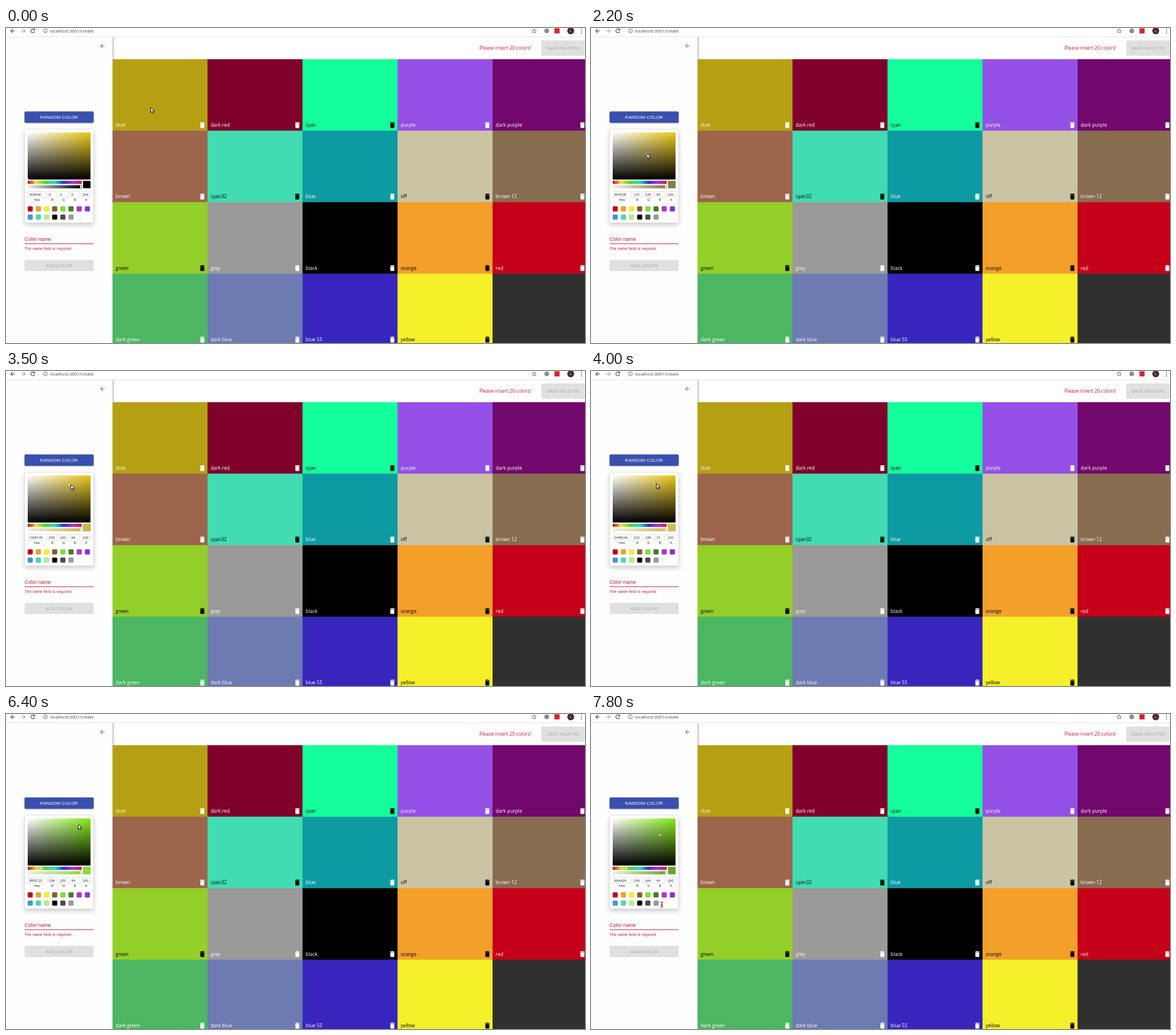
These frames come from a looping animation (1014 px wide and 552 px high, 8000 ms). An HTML page:

```html
<!DOCTYPE html>
<html lang="en">
<head>
<meta charset="utf-8">
<title>Create a palette</title>
<style>
  html, body { margin: 0; width: 100%; height: 100%; overflow: hidden; background: #fff; }
  svg { display: block; }
  text { font-family: "Liberation Sans", Arial, sans-serif; }
  .ui { font: 500 8.5px "Open Sans", "Noto Sans", sans-serif; }
  .url { font: 7.65px "Open Sans", "Noto Sans", sans-serif; fill: #444; }
  .btn { font-size: 7.7px; letter-spacing: .22px; text-anchor: middle; }
  .small { font-size: 6.05px; fill: #222; }
  .mid { text-anchor: middle; }
  .off { fill: #a6a6a6; }
  .error { fill: #c4122f; }
  .line { fill: none; stroke: #555; stroke-width: 1.2; }
  .card { fill: #fff; filter: drop-shadow(0 0 .5px #0006) drop-shadow(0 4px 4px #0003); }
  .raised { fill: #3a50ae; filter: drop-shadow(0 1px 1px #0006); }
</style>
</head>
<body>
<svg width="1014" height="552" viewBox="0 0 1014 552">
  <defs>
    <linearGradient id="white"><stop stop-color="#fff"/><stop offset="1" stop-color="#fff" stop-opacity="0"/></linearGradient>
    <linearGradient id="black" x1="0" y1="1" x2="0" y2="0"><stop/><stop offset="1" stop-opacity="0"/></linearGradient>
    <linearGradient id="hues"></linearGradient>
    <linearGradient id="fade"><stop class="tone" stop-opacity="0"/><stop class="tone" offset="1"/></linearGradient>
    <linearGradient id="edge"><stop stop-color="#bbb"/><stop offset="1" stop-color="#fff"/></linearGradient>
    <pattern id="checks" x="38" y="275.4" width="4.4" height="4.4" patternUnits="userSpaceOnUse">
      <path fill="#fff" d="M0 0h4.4v4.4H0z"/><path fill="#ddd" d="M0 0h2.2v2.2H0zM2.2 2.2h2.2v2.2H2.2z"/>
    </pattern>
    <clipPath id="area"><path d="M37.5 182.5h111v83h-111z"/></clipPath>
    <path id="square" d="M38 183h110v82.500H38z"/>
    <path id="bin" transform="scale(.57) translate(-12 -12)" d="M6 19c0 1.1.9 2 2 2h8c1.1 0 2-.9 2-2V7H6v12zM19 4h-3.5l-1-1h-5l-1 1H5v2h14V4z"/>
    <rect id="thumb" width="2.3" height="4.8" rx=".5" fill="#fff" stroke="#0006" stroke-width=".3"/>
  </defs>

  <!-- browser bar -->
  <path class="line" d="M15.5 5.2h-7M11.8 1.7L8.3 5.2l3.5 3.5"/>
  <path class="line" style="stroke:#aaa" d="M26.5 5.2h7M30.2 1.7l3.5 3.5-3.5 3.5"/>
  <path class="line" d="M49.5 2.8a3.4 3.4 0 1 0 .7 3.2M50.3 1v2.6h-2.600"/>
  <circle class="line" cx="69" cy="5" r="3.5" style="stroke-width:.8"/>
  <path class="line" style="stroke-width:.9" d="M69 4.6v2.4M69 2.9v.9"/>
  <text class="url" x="77" y="7.7">localhost:3001/create</text>
  <path class="line" style="stroke-width:.8" d="M925 1.2l1.100 2.600 2.800.2-2.100 1.800.7 2.800-2.500-1.500-2.500 1.500.7-2.800-2.100-1.800 2.800-.2z"/>
  <circle cx="947" cy="5" r="4.3" fill="#8c8f8c"/>
  <path fill="#d3232f" d="M960.5 .5h9v9h-9z"/>
  <circle cx="989" cy="5" r="6" fill="#492b2c"/>
  <text class="mid" x="989" y="7.3" font-size="6" fill="#eee">L</text>
  <path fill="#555" d="M1007 1h1.600v1.600H1007zM1007 4.400h1.600V6H1007zM1007 7.800h1.600v1.600H1007z"/>

  <!-- sidebar -->
  <path fill="#fefefe" d="M0 15.5h186.500V552H0z"/>
  <path fill="#ddd" d="M0 15h1014v.8H0z"/>
  <path class="line" style="stroke:#777;stroke-width:1.1" d="M173 31.3h-7M169.200 27.800l-3.500 3.500 3.500 3.500"/>
  <rect class="raised" x="32.5" y="146.3" width="121" height="19.8" rx="2"/>
  <text class="btn" x="93" y="159">RANDOM COLOR</text>
  <rect class="card" x="32.5" y="177.5" width="121" height="163.5" rx="2"/>
  <use id="base" href="#square"/>
  <use href="#square" fill="url(#white)"/>
  <use href="#square" fill="url(#black)"/>
  <g clip-path="url(#area)"><g id="ring" fill="none">
    <circle r="2.2" stroke="#0006" stroke-width=".6"/><circle r="1.6" stroke="#fff" stroke-width=".9"/>
  </g></g>
  <path fill="url(#hues)" d="M38 267.7h94.500v5.500H38z"/>
  <use id="knob" href="#thumb" y="268"/>
  <path fill="url(#checks)" d="M38 275.4h94.500v5.500H38z"/>
  <path fill="url(#fade)" d="M38 275.4h94.500v5.500H38z"/>
  <use href="#thumb" x="129.7" y="275.8"/>
  <rect id="chip" x="135" y="267.9" width="13" height="12.9" rx="1" stroke="#0004" stroke-width=".5"/>
  <g id="fields"></g>
  <g id="presets"></g>
  <text class="error" x="32.5" y="372.8" font-size="8.8" letter-spacing=".08">Color name</text>
  <path fill="#c4193d" d="M32.5 377.4h121v1.200h-121z"/>
  <text class="error" x="32.5" y="388.6" font-size="6.6" letter-spacing=".22">The name field is required</text>
  <rect x="32.5" y="406.3" width="121" height="19.8" rx="2" fill="#e0e0e0"/>
  <text class="btn off" x="93" y="418.8">ADD COLOR</text>

  <!-- header -->
  <path fill="#fff" d="M186.5 16h828v38.500h-828z"/>
  <path fill="url(#edge)" d="M186.5 16h4v38.500h-4z"/>
  <text class="ui error" x="829" y="38.3">Please insert 20 colors!</text>
  <rect x="937.5" y="21.7" width="76" height="27" rx="2" fill="#e0e0e0"/>
  <text class="btn off" x="975.5" y="38">SAVE PALETTE</text>

  <g id="grid"></g>
  <g id="cursor" fill="#fff" stroke="#000" stroke-width=".9" stroke-linejoin="round">
    <path id="arrow" d="M.5.3v8.900l2.100-1.900 1.500 3.200 1.400-.6-1.500-3.200h2.900z"/>
    <path id="hand" d="M-1 1q0-1 .9-1t.9 1v3l3.600.7q1.400.4 1.200 1.800l-.6 3.500h-5l-3-3.600q-.6-1.100.5-1l1.500.9z"/>
    <path id="beam" fill="none" d="M-2.500-4.500q2.500 0 2.500 1.200 0-1.200 2.500-1.200M0-3.300v6.600M-2.500 4.500q2.500 0 2.500-1.200 0 1.200 2.500 1.200M-1.400.5h2.800"/>
  </g>
</svg>
<script>
const $ = id => document.getElementById(id);
const add = (parent, tag, attrs, text) => {
  const node = document.createElementNS('http://www.w3.org/2000/svg', tag);
  for (const key in attrs) node.setAttribute(key, attrs[key]);
  if (text) node.textContent = text;
  return parent.appendChild(node);
};
document.querySelector('.btn:not(.off)').setAttribute('fill', '#fff');

// Palette: name, fill, and "k" where the label is black
const palette = `dust,#b5a014|dark red,#80002c|cyan,#14ff9c,k|purple,#9450e6|dark purple,#72086c
|brown,#9c654c|cyan32,#41dcb2,k|blue,#0d9aa2|off,#cac4a4,k|brown 12,#886c50
|green,#94ce28,k|grey,#9a9a98|black,#000|orange,#f2a02a,k|red,#c50019
|dark green,#4cb662|dark blue,#6e7ab2|blue 55,#3826bc|yellow,#f5f02a,k|,#303030`;
palette.split('|').forEach((entry, i) => {
  const [name, fill, dark] = entry.trim().split(',');
  const x = 186.5 + i % 5 * 166.4, y = 54.6 + Math.floor(i / 5) * 125.3;
  const ink = dark ? '#000' : '#fff';
  add($('grid'), 'rect', { x, y, width: 167, height: 126, fill });
  if (!name) return;
  add($('grid'), 'text', { class: 'ui', x: x + 5.5, y: y + 118.3, fill: ink }, name);
  add($('grid'), 'use', { href: '#bin', x: x + 157.3, y: y + 115.5, fill: ink });
});

'#c8101e #f0e020 #40d830 #20e0c0 #3030d0 #b030d8 #d01830'.split(' ').forEach((color, i) =>
  add($('hues'), 'stop', { offset: i / 6, 'stop-color': color }));

const swatches = ('#c50019 #f2a029 #f5f02a #8a5a2c #80e135 #40801a #ae33d0 #8a2fe6 ' +
  '#4595d5 #41dcb4 #b3ee88 #000 #4a4a4a #9a9a98 #fff').split(' ').map((fill, i) =>
  add($('presets'), 'rect', {
    x: 38 + i % 8 * 14.3, y: i < 8 ? 312.6 : 326.9, width: 8.8, height: 8.8, rx: 1.65,
    fill, stroke: '#0003', 'stroke-width': .4
  }));

const inputs = ['Hex', 'R', 'G', 'B', 'A'].map((label, i) => {
  const x = i ? 53.4 + 19.7 * i : 38.2, width = i ? 16.3 : 32;
  add($('fields'), 'rect', { x, y: 286.2, width, height: 10.2, fill: '#fff', stroke: '#ccc', 'stroke-width': .6 });
  add($('fields'), 'text', { class: 'small mid', x: x + width / 2, y: 303 }, label);
  return add($('fields'), 'text', { class: 'small', x: x + (i ? 2 : 2.8), y: 293.5 });
});

// Stops: travel time, arrival time, x, y
const moves = [
  [0, 100, 253, 139], [400, 500, 66, 248], [200, 700, 142, 175], [100, 900, 73, 247],
  [300, 1300, 141, 187], [200, 1500, 72, 243], [100, 1700, 87, 233], [1200, 2900, 112, 201],
  [1100, 4000, 114, 197], [300, 4300, 135, 228], [400, 4700, 96, 320], [200, 5000, 142, 328],
  [400, 5500, 100, 312.5], [100, 5800, 102, 303], [500, 6400, 126, 193],
  [800, 7200, 121, 212], [400, 7800, 124, 334]
];
// Stops: travel time, arrival time, saturation, value
const picks = [
  [0, 0, 0, 0], [0, 1700, .4456, .3712], [1200, 2900, .6724, .7698], [1100, 4000, .6516, .8306],
  [200, 4200, .591, .8627], [0, 5600, .8436, .8275], [200, 6400, .8, .8627], [800, 7200, .756, .6431]
];

// Each stop is left only when the travel to the next one begins.
const at = (stops, t) => stops.reduce(([x, y], [span, end, nx, ny]) => {
  const f = t >= end ? 1 : Math.max(0, 1 - (end - t) / span);
  return [x + (nx - x) * f, y + (ny - y) * f];
}, stops[0].slice(2));

function toRgb(h, s, v) {
  return [5, 3, 1].map(n => {
    const k = (n + h / 60) % 6;
    return Math.round(255 * v * (1 - s * Math.max(0, Math.min(k, 4 - k, 1))));
  });
}

function draw(t) {
  const [x, y] = at(moves, t), [s, v] = at(picks, t);
  const hue = t < 5600 ? 50.22 : 88.6;
  const rgb = toRgb(hue, s, v);
  const hex = rgb.map(c => c.toString(16).padStart(2, '0')).join('').toUpperCase();

  $('base').setAttribute('fill', `hsl(${hue},83%,50%)`);
  $('ring').setAttribute('transform', `translate(${38 + 110 * s} ${265 - 82 * v})`);
  $('knob').setAttribute('x', 36.9 + 94.5 * hue / 360);
  $('chip').setAttribute('fill', '#' + hex);
  document.querySelectorAll('.tone').forEach(n => n.setAttribute('stop-color', '#' + hex));
  [hex, ...rgb, 100].forEach((value, i) => inputs[i].textContent = value);

  const hover = t >= 5400 && t < 5800;
  swatches[4].style.filter = hover ? 'drop-shadow(0 0 2px #80e135)' : '';
  const shape = hover ? 'hand' : (t >= 5800 && t < 6000) || t >= 7800 ? 'beam' : 'arrow';
  for (const id of ['arrow', 'hand', 'beam']) $(id).style.display = id === shape ? '' : 'none';
  $('cursor').setAttribute('transform', `translate(${x} ${y})`);
}

const start = performance.now();
function tick() {
  const t = (performance.now() - start) % 8000;
  draw(Math.floor(t / 100) * 100);
  requestAnimationFrame(tick);
}
tick();
</script>
</body>
</html>
```
